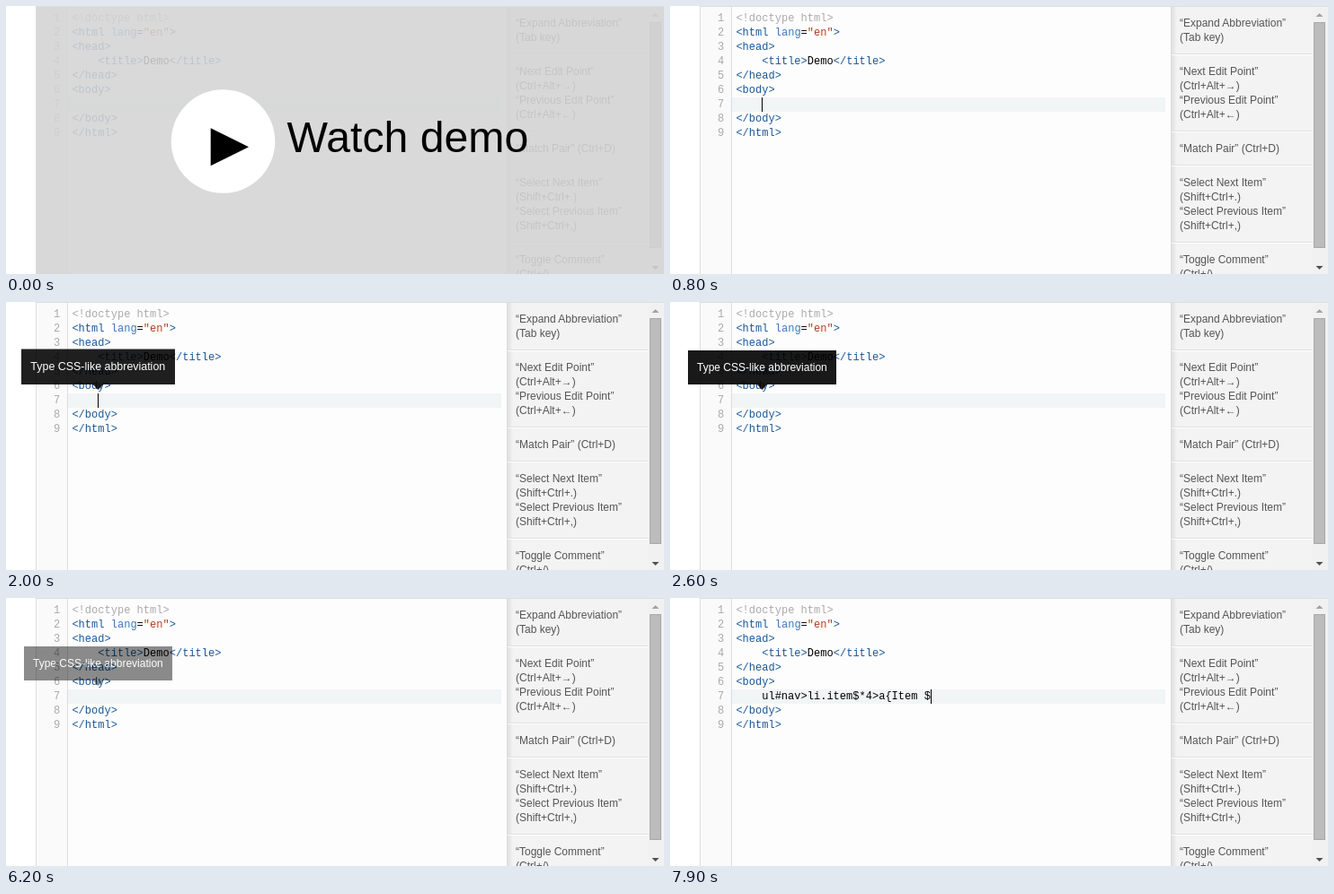
Animation, 732 px wide and 299 px high, one loop 8 s. Source, as an HTML page:

```html
<!DOCTYPE html>
<html lang="en">
<head>
<meta charset="utf-8">
<title>Editor demo</title>
<style>
  html, body { margin: 0; width: 100%; height: 100%; overflow: hidden; background: #fff; }
  svg { display: block; width: 732px; height: 299px; }
  text { white-space: pre; }
  .code { font: 12px "Liberation Mono", "Noto Sans Mono", monospace; letter-spacing: .02px; }
  .ui { font: 12px "Liberation Sans", Arial, sans-serif; }
  .big { font: 48.2px "Liberation Sans", Arial, sans-serif; }
  .num { fill: #aaa; }
  .tag { fill: #1a5796; }
  .attr { fill: #3a78b8; }
  .str { fill: #b33a20; }
  .doc { fill: #aaa; }
  .note { fill: #555; }
</style>
</head>
<body>
<svg viewBox="0 0 732 299" xmlns="http://www.w3.org/2000/svg">
  <defs>
    <linearGradient id="shade">
      <stop offset="0" stop-color="#dcdcdc"/>
      <stop offset="1" stop-color="#f3f3f3"/>
    </linearGradient>
  </defs>

  <g shape-rendering="crispEdges">
    <rect x="33" width="699" height="299" fill="#ddd"/>
    <rect x="34" y="1" width="523" height="298" fill="#fdfdfd"/>
    <rect x="34" y="1" width="34" height="298" fill="#fafafa"/>
    <rect x="68" y="1" width="1" height="298" fill="#ddd"/>
    <rect x="69" y="102" width="482" height="16" fill="#f1f5f5"/>
    <rect x="557" y="1" width="158" height="298" fill="#f3f3f3"/>
    <rect x="557" y="1" width="7" height="298" fill="url(#shade)"/>
    <rect x="715" y="1" width="17" height="298" fill="#f1f1f1"/>
    <rect x="716.5" y="18.5" width="12" height="251" fill="#bcbcbc" stroke="#a8a8a8"/>
  </g>
  <path d="M718.5 12h8l-4-4z" fill="#a3a3a3"/>
  <path d="M718.5 290h8l-4 4z" fill="#505050"/>
  <g id="rules" shape-rendering="crispEdges"></g>
  <g id="notes" class="ui note"></g>
  <g id="lines" class="code"></g>
  <text id="typed" class="code" x="102.2" y="113"></text>
  <rect id="caret" y="102" width="1" height="16" shape-rendering="crispEdges"/>

  <g id="tip">
    <path d="M20 54H185V92H108L102.5 98L97 92H20z" fill-opacity=".9"/>
    <text class="ui" x="30" y="77" fill="#fff">Type CSS-like abbreviation</text>
  </g>

  <g id="cover">
    <rect x="34" y="1" width="698" height="298" fill="#d4d4d4" fill-opacity=".88"/>
    <circle cx="241.5" cy="151" r="57.8" fill="#fff"/>
    <g id="play">
      <path d="M227.7 136.3L270 157.2L227.7 178.2z"/>
      <text class="big" x="312.5" y="163">Watch demo</text>
    </g>
  </g>
</svg>

<script>
const LOOP = 8000, STEP = 100, CHAR = 7.22;
const $ = id => document.getElementById(id);

function add(parent, name, attrs, text = '') {
  const el = document.createElementNS('http://www.w3.org/2000/svg', name);
  for (const key in attrs) el.setAttribute(key, attrs[key]);
  el.textContent = text;
  parent.append(el);
  return el;
}

// each row: indent in characters, then [class, text] pairs
const rows = [
  [0, ['doc', '<!doctype html>']],
  [0, ['tag', '<html '], ['attr', 'lang'], ['', '='], ['str', '"en"'], ['tag', '>']],
  [0, ['tag', '<head>']],
  [4, ['tag', '<title>'], ['', 'Demo'], ['tag', '</title>']],
  [0, ['tag', '</head>']],
  [0, ['tag', '<body>']],
  [0],
  [0, ['tag', '</body>']],
  [0, ['tag', '</html>']]
];
rows.forEach(([indent, ...parts], i) => {
  const y = 17 + i * 16;
  add($('lines'), 'text', { x: 53, y, class: 'num' }, i + 1);
  const line = add($('lines'), 'text', { x: 73.4 + indent * CHAR, y });
  for (const [cls, text] of parts) add(line, 'tspan', { class: cls }, text);
});

const notes = [
  [23, '“Expand Abbreviation”', '(Tab key)'],
  [77, '“Next Edit Point”', '(Ctrl+Alt+→)', '“Previous Edit Point”', '(Ctrl+Alt+←)'],
  [163, '“Match Pair” (Ctrl+D)'],
  [201, '“Select Next Item”', '(Shift+Ctrl+.)', '“Select Previous Item”', '(Shift+Ctrl+,)'],
  [287, '“Toggle Comment”', '(Ctrl+/)']
];
notes.forEach(([top, ...texts], i) => {
  texts.forEach((text, k) => add($('notes'), 'text', { x: 567, y: top + k * 16 }, text));
  if (i) {
    add($('rules'), 'rect', { x: 558, y: top - 24, width: 157, height: 1, fill: '#e0e0e0' });
    add($('rules'), 'rect', { x: 558, y: top - 23, width: 157, height: 1, fill: '#fff' });
  }
});

const snippet = 'ul#nav>li.item$*4>a{Item $';

function tipOpacity(t) {
  if (t < 1800 || t >= 6400) return 0;
  if (t >= 6300) return .1;
  if (t >= 6200) return .5;
  return 1 - .7 * .2 ** ((t - 1800) / 100);
}

function draw(now) {
  const t = Math.floor(now % LOOP / STEP) * STEP;

  $('cover').style.display = t < 800 ? '' : 'none';
  $('play').setAttribute('fill', t < 100 ? '#000' : '#08c');

  const scale = 1 + .376 * .31 ** Math.max(0, (t - 1800) / 100);
  $('tip').setAttribute('opacity', tipOpacity(t));
  $('tip').setAttribute('transform',
    `translate(102.5 95) scale(${t < 2400 ? scale : 1}) translate(-102.5 -95)`);

  const count = Math.max(0, Math.floor((t - 6310) / 60));
  const blinkOn = Math.floor((t - 800) / 600) % 2 === 0;
  $('typed').textContent = snippet.slice(0, count);
  $('caret').setAttribute('x', Math.round(102 + count * CHAR));
  $('caret').style.display = t >= 6300 || (t >= 800 && blinkOn) ? '' : 'none';
}

function tick() {
  draw(performance.now());
  requestAnimationFrame(tick);
}
tick();
</script>
</body>
</html>
```
